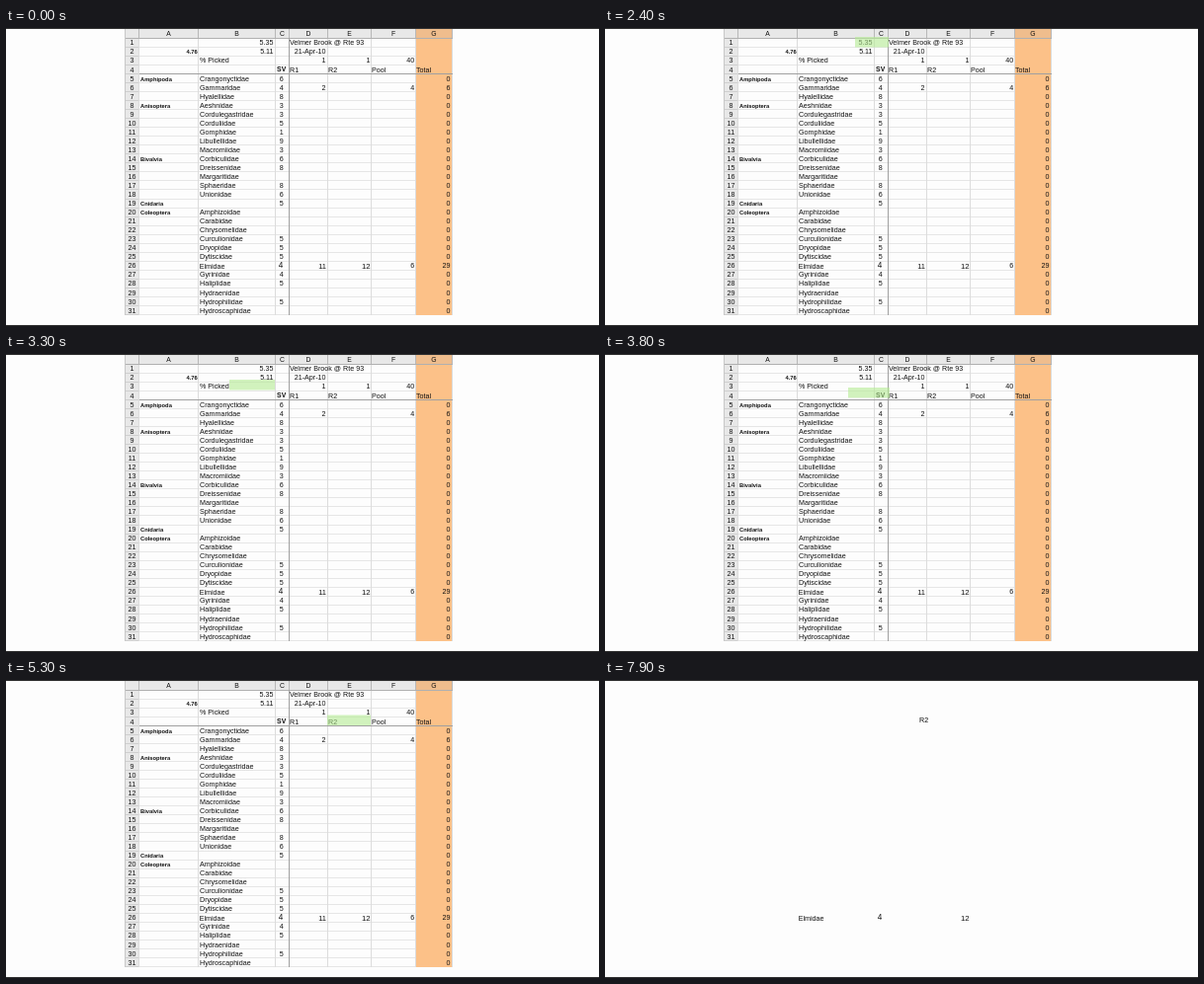
These frames come from a looping animation (600x302 px, 8000 ms). An HTML page with a canvas:

```html
<!DOCTYPE html>
<html lang="en">
<head>
<meta charset="utf-8">
<title>Sample sheet</title>
<style>
html, body { margin: 0; width: 100%; height: 100%; overflow: hidden; background: #fdfdfd; }
canvas { display: block; }
</style>
</head>
<body>
<canvas id="stage" width="600" height="302"></canvas>
<script>
const ctx = document.getElementById('stage').getContext('2d');
const LOOP = 8000, STEP = 100, SHEET_END = 6900;
const ROW_HEIGHT = 9.04;
const columns = [134.5, 194.5, 272.5, 286.5, 325.5, 369.5, 414.5, 451.5];

// Row 5 onwards: "group|family|score"
const taxa = `Amphipoda|Crangonyctidae|6
|Gammaridae|4
|Hyalellidae|8
Anisoptera|Aeshnidae|3
|Cordulegastridae|3
|Corduliidae|5
|Gomphidae|1
|Libullellidae|9
|Macromiidae|3
Bivalvia|Corbiculidae|6
|Dreissenidae|8
|Margaritidae|
|Sphaeridae|8
|Unionidae|6
Cnidaria||5
Coleoptera|Amphizoidae|
|Carabidae|
|Chrysomelidae|
|Curculionidae|5
|Dryopidae|5
|Dytiscidae|5
||
|Gyrinidae|4
|Haliplidae|5
|Hydraenidae|
|Hydrophilidae|5
|Hydroscaphidae|`.split('\n').map(line => line.split('|'));

// Highlight path: time, left, top, width
const path = [
  [1700, 268, 9, 34],
  [2400, 253, 9, 34],
  [3300, 226, 26, 46],
  [3800, 246, 34, 42],
  [4600, 325, 35.5, 44]
];
const HIGHLIGHT_START = 1000, HIGHLIGHT_END = 5700;

const rowCenter = row => 51 + (row - 5) * ROW_HEIGHT;
const clamp = v => Math.max(0, Math.min(1, v));

function text(value, x, y, { align = 'left', size = 7.15, bold = false } = {}) {
  ctx.font = `${bold ? 'bold ' : ''}${size}px "Liberation Sans", Arial, sans-serif`;
  ctx.textAlign = align;
  ctx.fillStyle = '#111';
  ctx.fillText(value, x, y + size * 0.36);
}

function line(x1, y1, x2, y2, color) {
  ctx.strokeStyle = color;
  ctx.beginPath();
  ctx.moveTo(x1, y1);
  ctx.lineTo(x2, y2);
  ctx.stroke();
}

function fill(x, y, w, h, color) {
  ctx.fillStyle = color;
  ctx.fillRect(x, y, w, h);
}

function drawGrid() {
  fill(121, 1, 331, 290, '#fdfdfd');
  fill(121, 1, 293, 9, '#e8e8e8');
  fill(121, 1, 13, 290, '#e8e8e8');
  fill(414, 1, 38, 9, '#efbd8d');
  fill(414, 10, 38, 281, '#fcc188');
  for (let row = 1; row <= 31; row++) {
    const bottom = Math.round(rowCenter(row) + 4) + 0.5;
    line(121, bottom, 134, bottom, '#cfcfcf');
    line(135, bottom, 414, bottom, '#e6e6e6');
    text(row, 127.5, rowCenter(row), { align: 'center' });
  }
  columns.forEach((x, i) => {
    line(x, 10, x, 291, '#dcdcdc');
    line(x, 1, x, 10, '#b8b8b8');
    if (i < 7) text('ABCDEFG'[i], (x + columns[i + 1]) / 2, 5.5, { align: 'center', size: 6.8 });
  });
  line(121, 10.5, 452, 10.5, '#b0b0b0');
  line(120.5, 0, 120.5, 291, '#c8c8c8');
  line(135, 46.5, 452, 46.5, '#a0a0a0');
  line(286.5, 10, 286.5, 291, '#a0a0a0');
}

function drawCells() {
  const right = (value, x, row, style) => text(value, x, rowCenter(row), { align: 'right', ...style });
  const left = (value, x, row) => text(value, x, rowCenter(row));

  right('5.35', 270.5, 1);
  right('5.11', 270.5, 2);
  right('4.76', 193.7, 2, { size: 5.8, bold: true });
  left('Velmer Brook @ Rte 93', 287, 1);
  right('21-Apr-10', 323.5, 2);
  left('% Picked', 196, 3);
  right('1', 323.5, 3);
  right('1', 368.5, 3);
  right('40', 413.3, 3);
  text('SV', 278.7, rowCenter(4), { align: 'center', size: 6.9, bold: true });
  left('R1', 287, 4);
  left('Pool', 370, 4);
  left('Total', 415, 4);

  taxa.forEach(([group, family, score], i) => {
    const row = i + 5, y = rowCenter(row);
    text(group, 136, y + 0.5, { size: 5.8, bold: true });
    text(family, 196, y);
    text(score, 278.8, y, { align: 'center' });
    right({ 6: '6', 26: '29' }[row] || '0', 449.5, row);
  });
  right('2', 323.5, 6);
  right('4', 413.3, 6);
  right('11', 324, 26, { size: 7.5 });
  right('6', 413.3, 26);
}

function drawFocus(t) {
  const slide = clamp((t - 7600) / 300) ** 2;
  const lift = t < 6800 ? 0 : 1;
  text('R2', 326 - 8 * slide, 42 - lift - 0.7 * slide);
  text('Elmidae', 195.7, 241);
  text('4', 278, 240.3, { align: 'center', size: 8.2 });
  text('12', 364.3, 240.8, { align: 'center', size: 7.8 });
}

function drawHighlight(t) {
  if (t < HIGHLIGHT_START || t >= HIGHLIGHT_END) return;
  let i = 0;
  while (i < path.length - 2 && t > path[i + 1][0]) i++;
  const from = path[i], to = path[i + 1];
  const p = clamp((t - from[0]) / (to[0] - from[0]));
  const [, x, y, w] = from.map((v, k) => v + (to[k] - v) * p);
  const alpha = 0.6 * clamp((t - HIGHLIGHT_START + STEP) / 400);
  fill(x, y, w, 10.5, `rgba(180, 235, 147, ${alpha})`);
}

function draw(now) {
  const t = Math.floor((now % LOOP) / STEP) * STEP;
  fill(0, 0, 600, 302, '#fdfdfd');
  if (t < SHEET_END) {
    drawGrid();
    drawCells();
  }
  drawFocus(t);
  drawHighlight(t);
  fill(0, 0, 600, 1, '#333');
  fill(0, 301, 600, 1, '#333');
}

const start = performance.now();
function frame() {
  draw(performance.now() - start);
  requestAnimationFrame(frame);
}
frame();
</script>
</body>
</html>
```
